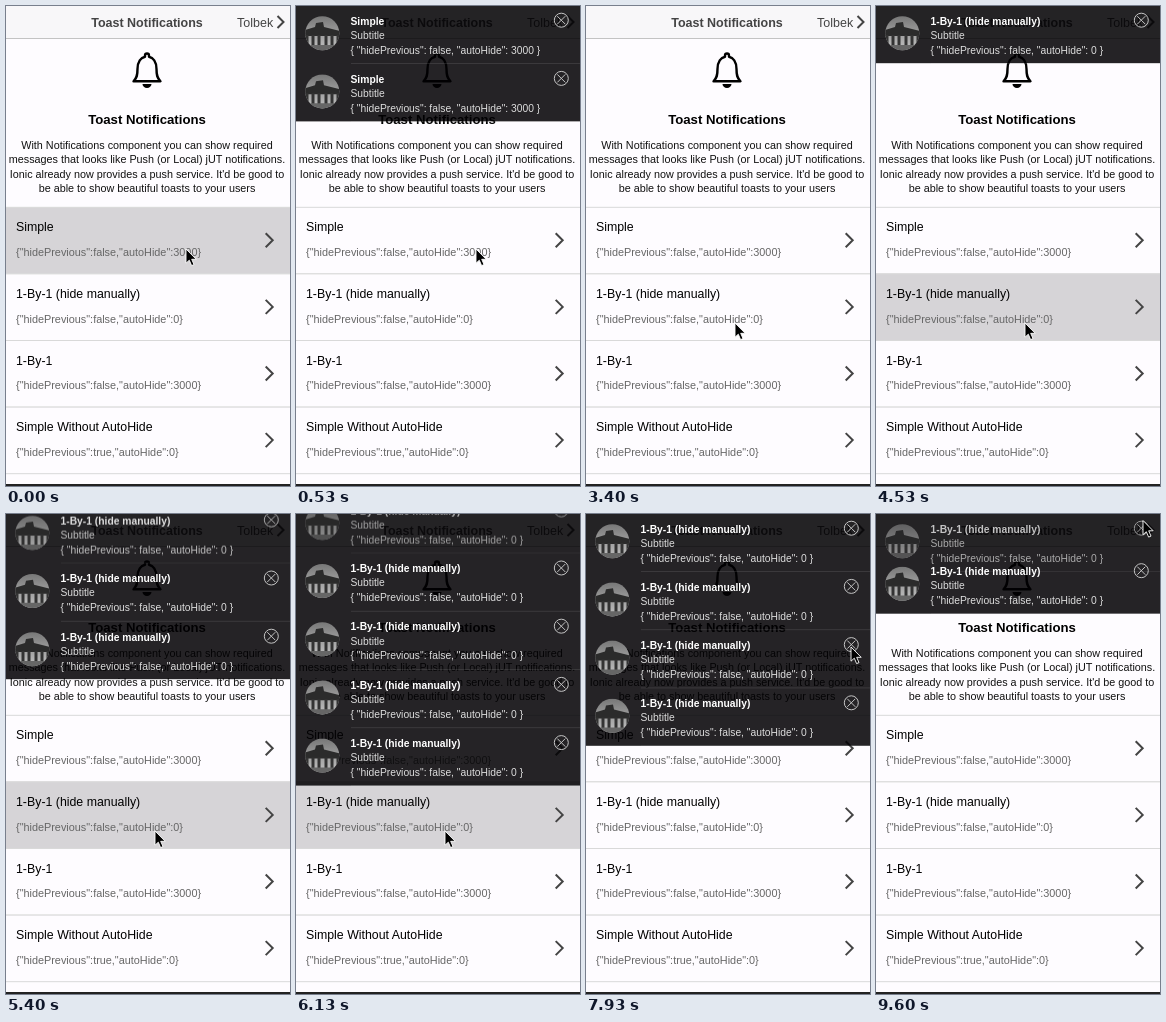
An HTML page that plays this animation: 284x480 px, repeating every 9.67 s.

```html
<!DOCTYPE html>
<html lang="en">
<head>
<meta charset="utf-8">
<title>Toast Notifications</title>
<style>
  html, body { margin: 0; width: 100%; height: 100%; overflow: hidden; background: #fff; }
  svg { display: block; width: 100vw; height: 100vh; font-family: "Liberation Sans", Arial, sans-serif; }
  .bold { font-weight: bold; }
  .mid { text-anchor: middle; }
  .chevron { fill: none; stroke: #444; stroke-width: 2; }
</style>
</head>
<body>
<svg viewBox="0 0 284 480">
  <defs>
    <clipPath id="round"><circle cx="26.3" cy="27.2" r="17"/></clipPath>
    <linearGradient id="sky" x2="0" y2="1">
      <stop stop-color="#777"/><stop offset="1" stop-color="#c4c4c4"/>
    </linearGradient>
    <g id="avatar" clip-path="url(#round)">
      <rect x="9" y="10" width="35" height="35" fill="url(#sky)"/>
      <path d="M9 24 19 21 20 17 27 16 28 21 44 25V30H9Z" fill="#2b2b2b"/>
      <path d="M11 29V41M17 29V41M23 29V41M30 29V41M36 29V41M42 29V41" stroke="#333" stroke-width="3"/>
      <path d="M9 39H44V45H9Z" fill="#666"/>
    </g>
    <g id="close" fill="none" stroke="#c4c4c4">
      <circle cx="265.3" cy="14.2" r="7"/>
      <path d="m261.3 10.2 8 8m0-8-8 8"/>
    </g>
  </defs>

  <rect width="284" height="480" fill="#fefcff"/>
  <rect width="284" height="32" fill="#f8f7f9"/>
  <path d="M0 32.5H284" stroke="#c3c3c3"/>
  <g fill="#444">
    <text class="mid bold" x="141" y="20.5" font-size="12.5">Toast Notifications</text>
    <text x="231" y="20.5" font-size="12.5">Tolbek</text>
  </g>
  <path class="chevron" d="m271.5 10 6 6-6 6"/>

  <path d="M127.5 75.3C131 72 131.5 69 131.5 63 131.5 55.5 135 51.5 139 50.7V49.5A2 2 0 0 1 143 49.5V50.7C147 51.5 150.5 55.5 150.5 63 150.5 69 151 72 154.5 75.3Z"
    fill="none" stroke="#000" stroke-width="2.4" stroke-linejoin="round"/>
  <path d="M136.5 78H145.5A4.5 4 0 0 1 136.5 78Z"/>

  <text class="mid bold" x="141" y="118" font-size="13.2">Toast Notifications</text>
  <g id="intro" class="mid" font-size="10.8" fill="#111"></g>
  <g id="rows"></g>
  <rect y="478" width="284" height="2" fill="#222"/>
  <rect id="backdrop" width="284" fill="#020003" fill-opacity=".86"/>
  <g id="toasts"></g>
  <path id="cursor" d="M0 0V14.2L3.3 11.2 5.6 16.6 8 15.6 5.7 10.3H10.2Z" stroke="#fff" stroke-width=".9"/>
</svg>
<script>
const LOOP = 9670, STEP = 1000 / 15, SLIDE = 450;
const TOAST_H = 58.2, ROW_TOP = 201.3, ROW_H = 66.6;
const $ = id => document.getElementById(id);

const intro = [
  "With Notifications component you can show required",
  "messages that looks like Push (or Local) jUT notifications.",
  "Ionic already now provides a push service. It'd be good to",
  "be able to show beautiful toasts to your users"
];
$("intro").innerHTML = intro.map((line, i) =>
  `<text x="141" y="${142.8 + i * 14.55}">${line}</text>`).join("");

const rows = [
  ["Simple", false, 3000],
  ["1-By-1 (hide manually)", false, 0],
  ["1-By-1", false, 3000],
  ["Simple Without AutoHide", true, 0]
];
$("rows").innerHTML = rows.map(([title, hidePrevious, autoHide], i) => `
  <g transform="translate(0 ${ROW_TOP + i * ROW_H})">
    <rect class="row" width="284" height="${ROW_H}"/>
    <path d="M0 0H284M0 ${ROW_H}H284" stroke="#d9d9d9"/>
    <text x="10" y="24.2" font-size="12.35">${title}</text>
    <text x="10" y="48.7" font-size="10.87" fill="#666">${JSON.stringify({ hidePrevious, autoHide })}</text>
    <path class="chevron" d="m259.7 26 7 7-7 7"/>
  </g>`).join("");
const rowBoxes = document.querySelectorAll(".row");

// Newest first: the stack grows from the top.
const toasts = [
  [1, 5953, 9515], [1, 5560, 8760], [1, 5148, 8080], [1, 4720, 7230], [1, 3970, Infinity],
  [0, 40, 2940], [0, 40, 2940]
].map(([row, enter, leave]) => ({ row, enter, leave }));

$("toasts").innerHTML = toasts.map(({ row }) => `
  <g fill="#fff" font-size="10.3">
    <path d="M55 ${TOAST_H - .7}H284" stroke="#fff" stroke-opacity=".1"/>
    <use href="#avatar"/>
    <text class="bold" x="54.5" y="18.5">${rows[row][0]}</text>
    <text x="54.5" y="32.7" fill="#ddd">Subtitle</text>
    <text x="54.5" y="47.5" fill="#ddd">{ "hidePrevious": false, "autoHide": ${rows[row][2]} }</text>
    <use href="#close"/>
  </g>`).join("");
toasts.forEach((toast, i) => toast.el = $("toasts").children[i]);

// Each move: start, end, x, y
const moves = [
  [0, 0, 180, 243],
  [1820, 2130, 149, 326],
  [2220, 2530, 149, 317],
  [6450, 7000, 265, 191],
  [7430, 7870, 265, 133],
  [8280, 8600, 265, 68],
  [8930, 9270, 267, 6.5]
];

const clamp = v => Math.min(1, Math.max(0, v));
const smooth = p => p * p * (3 - 2 * p);

// CSS "ease": cubic-bezier(.25, .1, .25, 1)
function ease(v) {
  const p = clamp(v);
  let s = p;
  for (let i = 0; i < 6; i++)
    s -= (.75 * s * (1 - s) + s ** 3 - p) / (.75 - 1.5 * s + 3 * s * s);
  return .3 * s * (1 - s) ** 2 + 3 * s * s * (1 - s) + s ** 3;
}

function drawRows(t) {
  rowBoxes.forEach((box, i) => {
    const pressed = toasts.some(({ row, enter }) => row === i && t >= enter - 190 && t < enter + 190);
    box.setAttribute("fill", pressed ? "#d6d4d7" : "#fefcff");
  });
}

// One backdrop follows the stack's height; only the contents fade.
function drawToasts(t) {
  let y = 0;
  for (const { el, enter, leave } of toasts) {
    const visible = t > enter && t < leave + SLIDE;
    el.style.display = visible ? "" : "none";
    if (!visible) continue;
    const shown = ease((t - enter) / SLIDE), left = 1 - ease((t - leave) / SLIDE);
    y -= TOAST_H * (1 - shown);
    el.setAttribute("transform", `translate(0 ${y})`);
    el.setAttribute("opacity", shown * left);
    y += TOAST_H * left;
  }
  $("backdrop").setAttribute("height", Math.max(0, y - 1));
}

function drawCursor(t) {
  let [, , x, y] = moves[0];
  for (const [start, end, toX, toY] of moves.slice(1)) {
    const p = smooth(clamp((t - start) / (end - start)));
    x += (toX - x) * p;
    y += (toY - y) * p;
  }
  $("cursor").setAttribute("transform", `translate(${x} ${y})`);
}

function frame() {
  const now = performance.now() % LOOP;
  const t = Math.floor((now + 5) / STEP) * STEP % LOOP;
  drawRows(t);
  drawToasts(t);
  drawCursor(t);
  requestAnimationFrame(frame);
}
frame();
</script>
</body>
</html>
```
